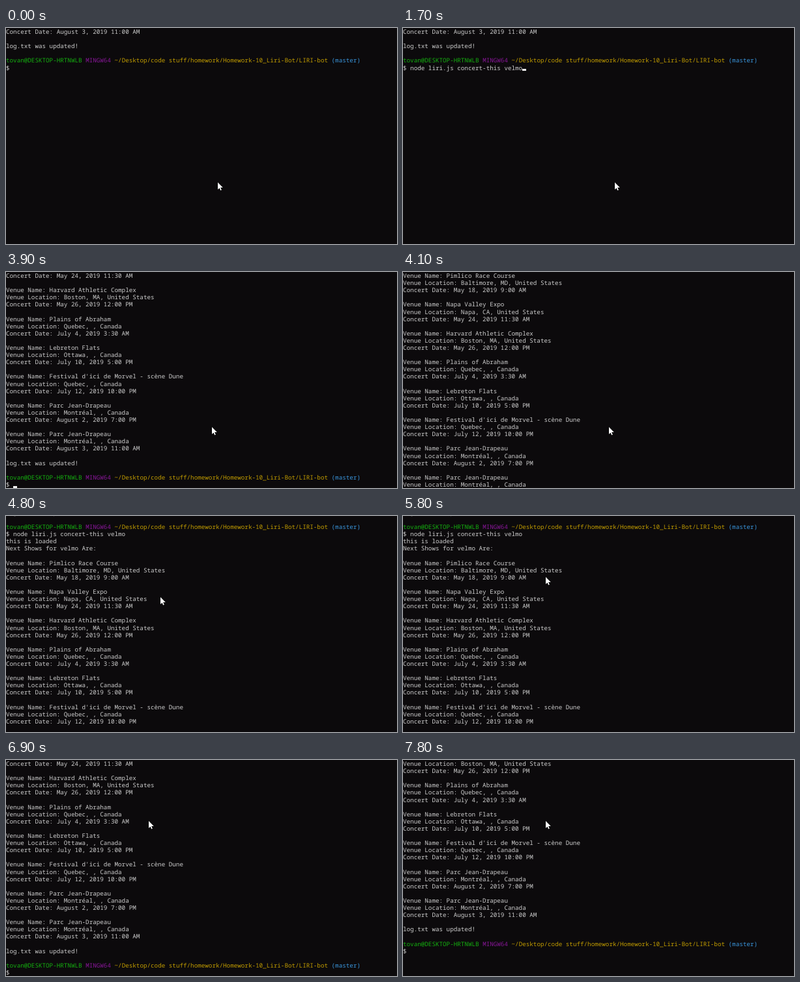
These frames come from a looping animation (600 px wide and 333 px high, 8 s). An HTML page:

```html
<!DOCTYPE html>
<html lang="en">
<head>
<meta charset="utf-8">
<title>Terminal session</title>
<style>
  html, body { margin: 0; width: 100%; height: 100%; overflow: hidden; background: #0c0a0c; }
  #buffer {
    position: absolute; left: 0; top: 0; width: 600px;
    font: 9.259px/11.1px "Noto Sans Mono", monospace;
    text-rendering: geometricPrecision; font-variant-ligatures: none;
    white-space: pre; color: #ccc;
  }
  .row { position: absolute; left: 0; height: 11.1px; }
  .user { color: #15b010; }
  .system { color: #881798; }
  .path { color: #c19c00; }
  .branch { color: #3a96dd; }
  #caret { position: absolute; width: 5.55px; height: 2.8px; background: #f2f2f2; }
  #mouse { position: absolute; left: 0; top: 0; overflow: visible; }
</style>
</head>
<body>
<div id="buffer"><div id="caret"></div></div>
<svg id="mouse" width="9" height="14">
  <path transform="scale(.694)" d="M0 0V16L3.7 12.5L6 18L8.4 17L6 11.6H11.3Z"
        fill="#fff" stroke="#000" stroke-width="1.4" paint-order="stroke"/>
</svg>
<script>
const LOOP = 8000, TICK = 100, COLUMNS = 108, ROWS = 30;
const CELL = 600 / COLUMNS, LINE = 333 / ROWS;
const buffer = document.getElementById("buffer");
const caret = document.getElementById("caret");
const mouse = document.getElementById("mouse");

const prompt = '<span class="user">tovan@DESKTOP-HRTNWLB</span> ' +
  '<span class="system">MINGW64</span> ' +
  '<span class="path">~/Desktop/code stuff/homework/Homework-10_Liri-Bot/LIRI-bot</span> ' +
  '<span class="branch">(master)</span>';
const command = "node liri.js concert-this velmo";
const show = (venue, place, date) =>
  [`Venue Name: ${venue}`, `Venue Location: ${place}`, `Concert Date: ${date}`, ""];

const lines = [
  "Concert Date: August 3, 2019 11:00 AM", "",
  "log.txt was updated!", "",
  prompt, `$ <span id="command">${command}</span>`,
  "this is loaded", "Next Shows for velmo Are:", "",
  ...show("Pimlico Race Course", "Baltimore, MD, United States", "May 18, 2019 9:00 AM"),
  ...show("Napa Valley Expo", "Napa, CA, United States", "May 24, 2019 11:30 AM"),
  ...show("Harvard Athletic Complex", "Boston, MA, United States", "May 26, 2019 12:00 PM"),
  ...show("Plains of Abraham", "Quebec, , Canada", "July 4, 2019 3:30 AM"),
  ...show("Lebreton Flats", "Ottawa, , Canada", "July 10, 2019 5:00 PM"),
  ...show("Festival d'ici de Morvel - scène Dune", "Quebec, , Canada", "July 12, 2019 10:00 PM"),
  ...show("Parc Jean-Drapeau", "Montréal, , Canada", "August 2, 2019 7:00 PM"),
  ...show("Parc Jean-Drapeau", "Montréal, , Canada", "August 3, 2019 11:00 AM"),
  "log.txt was updated!", "",
  prompt, "$ "
];
const rows = lines.map((html, i) => {
  const row = document.createElement("div");
  row.className = "row";
  row.style.top = i * LINE + "px";
  row.innerHTML = html;
  buffer.append(row);
  return row;
});
const typed = document.getElementById("command");

// [time, value] steps: lines printed so far, and first visible line once scrolled by wheel
const printed = [[0, 6], [2500, 7], [2600, 8], [2700, 25], [2800, 42], [3000, 43], [3100, 45]];
const wheel = [[4000, 12], [4100, 9], [4200, 6], [4400, 3],
  [6100, 6], [6300, 9], [6600, 12], [6800, 15], [7500, 18]];
// [time, x, y]
const pointer = [[0, 325, 238], [3100, 325, 238], [3700, 316, 239], [4500, 316, 239],
  [4800, 237, 125], [5200, 144, 116], [5300, 144, 116], [5600, 219, 94], [LOOP, 219, 94]];

const stepAt = (steps, t, fallback) =>
  steps.reduce((value, [time, next]) => t >= time ? next : value, fallback);

function pointerAt(t) {
  const i = pointer.findIndex(([time]) => time > t);
  const [t0, x0, y0] = pointer[i - 1], [t1, x1, y1] = pointer[i];
  const k = (t - t0) / (t1 - t0), ease = k * k * (3 - 2 * k);
  return [x0 + (x1 - x0) * ease, y0 + (y1 - y0) * ease];
}

function draw() {
  const now = performance.now() % LOOP;
  const t = Math.floor(now / TICK) * TICK;
  const count = stepAt(printed, t, 6);
  const top = stepAt(wheel, t, Math.max(0, count - ROWS));
  const hasCommand = t >= 100;

  buffer.style.top = -top * LINE + "px";
  rows.forEach((row, i) => row.style.visibility = i < count ? "visible" : "hidden");
  typed.style.display = hasCommand ? "" : "none";

  const column = count === 6 ? 2 + (hasCommand ? command.length : 0) : count === lines.length ? 2 : 0;
  caret.style.left = column * CELL + "px";
  caret.style.top = (count - 0.29) * LINE + "px";
  caret.style.visibility = hasCommand && (t + 420) % 1060 < 530 ? "visible" : "hidden";

  const [x, y] = pointerAt(t);
  mouse.style.transform = `translate(${x}px, ${y}px)`;
  requestAnimationFrame(draw);
}
draw();
</script>
</body>
</html>
```
